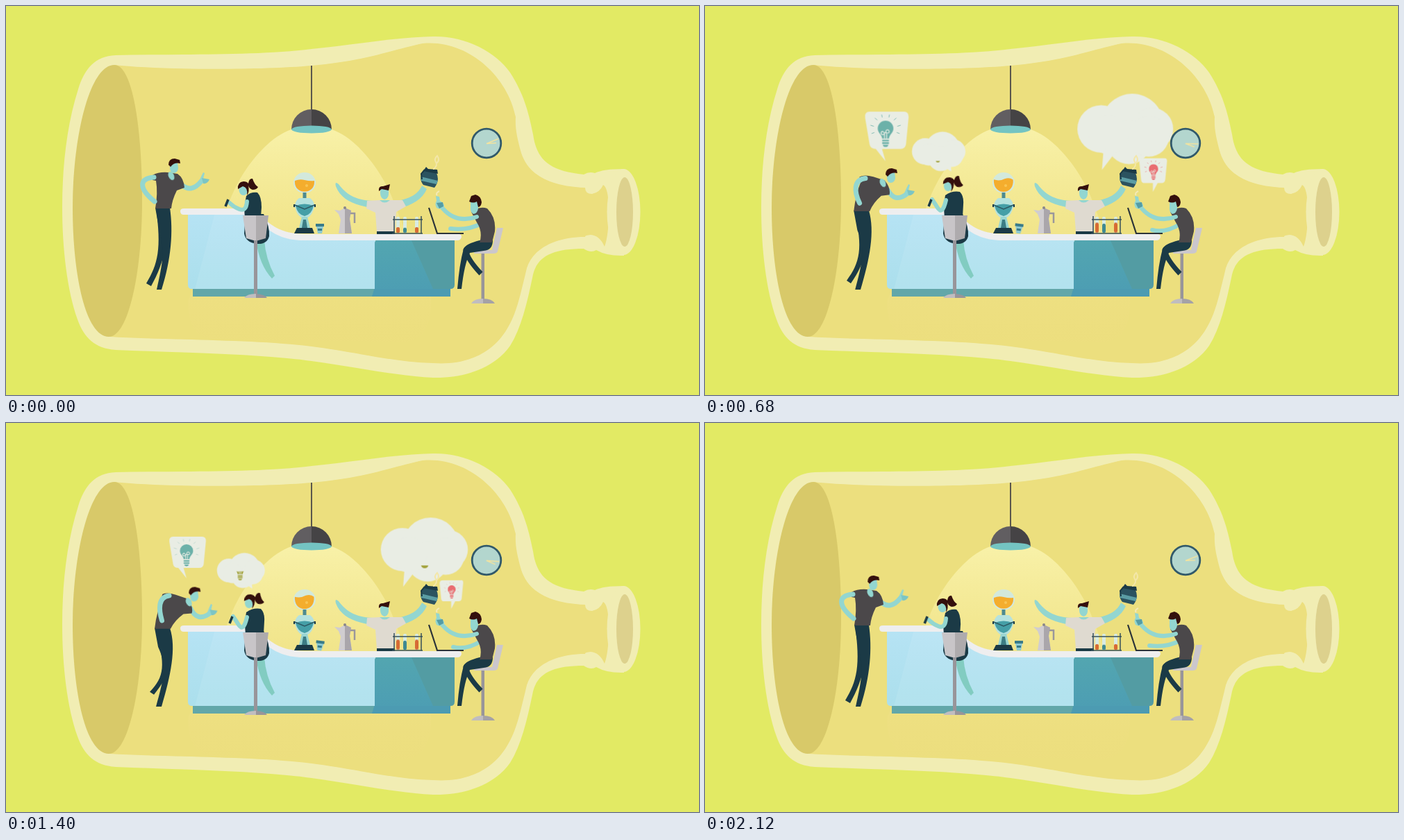
These frames come from a looping animation (998x561 px, 2.16 s). An HTML page without scripts:

```html
<!DOCTYPE html>
<html lang="en">
<head>
<meta charset="utf-8">
<title>Ideas in a bottle</title>
<style>
html,body{margin:0;width:100%;height:100%;overflow:hidden;background:#e2ea64}
svg{display:block;width:100vw;height:100vh}
.skin{fill:#93d6d0}
.limb{fill:none;stroke:#93d6d0;stroke-width:7;stroke-linecap:round;stroke-linejoin:round}
.navy{fill:#1b3a46}
.gray{fill:#4b484a}
.hair{fill:#34100d}
.say{fill:#e9ede4}
.glass{fill:#f1edb3}

/* Every part plays there and back */
.m,.mv{animation:1080ms ease-in-out infinite alternate}
.pop,.rise,.ray{animation:1080ms linear infinite alternate}
.mv{transform-box:fill-box;transform-origin:center}

/* standing man */
.lean{animation-timing-function:linear}
.m-head{animation-name:mHead}
.m-collar{animation-name:mCollar}
.m-torso{animation-name:mTorso}
.m-back{animation-name:mBack}
.m-arm{animation-name:mArm}
.m-hand{animation-name:mHand}
.m-leg{animation-name:mLeg}
.m-kick{animation-name:mKick;animation-timing-function:linear}
@keyframes mHead{0%{transform:none}33%{transform:translate(2px,0)}63%{transform:translate(26px,14px)}72%,100%{transform:translate(30px,17px)}}
@keyframes mCollar{0%,33%{transform:none}63%{transform:translate(18px,10px)}72%,100%{transform:translate(27px,14px)}}
@keyframes mTorso{
 0%,31%{d:path("M211 244Q220 239 233 240L247 242Q256 248 257 262L246 266Q239 280 238 292L215 292Q219 270 216 252L211 251Z")}
 72%,100%{d:path("M226 247Q232 244 245 248L262 254Q271 266 268 275L256 276Q243 285 237 297L214 297Q217 270 226 256L224 254Z")}}
@keyframes mBack{0%,31%{d:path("M213 247C190 249 192 264 214 282")}72%,100%{d:path("M236 249C220 251 221 269 225 285")}}
@keyframes mArm{0%,31%{d:path("M253 258Q267 270 281 253")}72%,100%{d:path("M266 267Q276 290 296 274")}}
@keyframes mHand{0%{transform:none}33%{transform:translate(2px,-1px) rotate(8deg)}63%{transform:translate(9px,17px)}72%,100%{transform:translate(12px,22px) rotate(-4deg)}}
@keyframes mLeg{
 0%,31%{d:path("M215 291L236 291C241 325 238 365 224 409L217 409C226 370 229 350 221 325Z")}
 72%,100%{d:path("M214 296L236 296C246 325 237 365 224 409L216 409C227 370 232 350 219 323Z")}}
@keyframes mKick{
 0%,33%{d:path("M216 291L232 291C236 335 228 370 209 404L202 400C219 372 224 350 216 291Z")}
 63%{d:path("M215 295L232 295C238 338 233 368 210 400L204 396C223 370 228 350 215 295Z")}
 70%{d:path("M215 296L232 296C242 340 237 362 213 392L207 388C228 366 230 350 215 296Z")}
 96%,100%{d:path("M215 296L232 296C256 347 256 350 217 378L212 373C240 352 242 352 215 296Z")}}

/* woman */
.w-head{animation-name:wHead}
.w-torso{animation-name:wTorso}
.w-arm{animation-name:wArm}
.w-pen{animation-name:wPen}
@keyframes wHead{0%,3%{transform:none}31%,100%{transform:translate(9px,-5px) rotate(9deg)}}
@keyframes wTorso{
 0%{d:path("M346 274Q352 268 362 269Q368 275 368 290L367 304L344 304Q342 290 346 274Z")}
 31%,100%{d:path("M346 273Q356 266 367 268Q373 274 372 286L371 304L345 304Q343 288 346 273Z")}}
@keyframes wArm{0%{d:path("M347 282Q346 297 336 293Q328 290 322 284")}31%,100%{d:path("M347 280Q342 302 335 291Q332 286 327 279")}}
@keyframes wPen{0%{transform:none}31%,100%{transform:translate(6px,0)}}

/* barista and seated man */
.b-left{animation-name:bLeft}
.b-right{animation-name:bRight}
.b-pot{animation-name:bPot}
.b-steam{animation-name:bSteam}
@keyframes bLeft{
 0%,71%{d:path("M530 281C505 281 490 272 479 257Q473 252 475 260C483 281 505 288 528 291Z")}
 95%,100%{d:path("M530 281C505 281 490 287 474 288Q468 290 474 292C490 293 505 292 528 291Z")}}
@keyframes bRight{
 0%,71%{d:path("M562 281C584 278 594 270 599 259L606 264C600 278 585 288 564 292Z")}
 95%,100%{d:path("M562 280C580 280 592 285 606 284L606 291C592 294 580 293 564 292Z")}}
@keyframes bPot{0%,71%{transform:none}95%,100%{transform:translate(9px,39px) rotate(10deg)}}
@keyframes bSteam{0%,71%{transform:none}95%,100%{transform:translate(5px,33px)}}
.s-head{animation-name:sHead}
.s-arm{animation-name:sArm}
.s-low{animation-name:sLow}
.s-cup{animation-name:sCup}
.s-leg{animation-name:sLeg}
@keyframes sHead{0%,71%{transform:none}95%,100%{transform:translate(-4px,1px)}}
@keyframes sArm{0%,71%{d:path("M678 304Q648 314 629 292")}95%,100%{d:path("M678 302Q655 313 633 294")}}
@keyframes sLow{0%,30%{d:path("M684 314Q665 324 640 321")}63%,100%{d:path("M685 314Q663 328 644 323")}}
@keyframes sCup{0%,71%{transform:none}95%,100%{transform:translate(5px,5px)}}
@keyframes sLeg{0%,71%{d:path("M694 346Q665 345 662 352Q665 366 684 386")}95%,100%{d:path("M694 346Q661 341 658 348Q661 363 679 378")}}

/* props */
.hands{animation-name:hands;transform-origin:692px 198px;animation-timing-function:linear}
@keyframes hands{to{transform:rotate(38deg)}}
.brew{animation-name:brew}
@keyframes brew{
 0%{d:path("M416 252Q423 249 430 251Q438 253 444 252C446 273 414 273 416 252Z")}
 33%{d:path("M416 249Q424 253 431 250Q438 247 444 250C446 274 414 274 416 249Z")}
 100%{d:path("M416 252Q424 253 432 248Q439 246 443 251C446 274 414 274 416 252Z")}}
.tube{animation-name:tube;transform-box:fill-box;transform-origin:bottom}
@keyframes tube{0%{transform:scaleY(.8)}60%,100%{transform:scaleY(1.45)}}
.cup{animation-name:cup}
@keyframes cup{0%{transform:none}33%,100%{transform:rotate(7deg)}}
.puff{animation-name:puff;opacity:0}
@keyframes puff{0%,22%,46%,100%{opacity:0}30%,37%{opacity:1}}

/* bubbles */
.p1{animation-name:p1;transform-origin:260px 224px}
.p2{animation-name:p2;transform-origin:353px 238px}
.p3{animation-name:p3;transform-origin:574px 235px}
.p4{animation-name:p4;transform-origin:649px 267px}
.p5{animation-name:p5;transform-origin:311px 156px}
@keyframes p1{0%,34%{transform:scale(0)}41%{transform:scale(1.05)}52%{transform:scale(1.22)}63%{transform:scale(1.28)}70.4%{transform:scale(1.07)}82%{transform:scale(.96)}96%,100%{transform:scale(1)}}
@keyframes p2{0%,29%{transform:scale(0)}33.3%{transform:scale(.16)}50%{transform:scale(.85)}63%{transform:scale(.885)}70.4%{transform:scale(.79)}85%{transform:scale(1.05)}96%,100%{transform:scale(1)}}
@keyframes p3{0%,36%{transform:scale(0)}52%{transform:scale(.87)}60%{transform:scale(1.2)}63%{transform:scale(1.18)}70.4%{transform:scale(1.07)}84%{transform:scale(.97)}96%,100%{transform:scale(1)}}
@keyframes p4{0%,28%{transform:translate(-19px,0) scale(0)}33.3%{transform:translate(-19px,0) scale(.28)}50%{transform:translate(-6px,0) scale(.8)}63%{transform:translate(-4px,1px) scale(.85)}70.4%{transform:translate(-8px,1px) scale(.72)}96%,100%{transform:none}}
@keyframes p5{0%,74%{transform:scale(0)}87%{transform:scale(1.6)}96%,100%{transform:scale(1)}}
.r2{animation-name:r2}
.r3{animation-name:r3}
.r4{animation-name:r4}
@keyframes r2{0%,61%{clip-path:inset(100% 0 0 0)}63%{clip-path:inset(92% 0 0 0)}70.4%{clip-path:inset(52% 0 0 0)}84%,100%{clip-path:inset(0)}}
@keyframes r3{0%,68%{clip-path:inset(100% 0 0 0)}70.4%{clip-path:inset(92% 0 0 0)}90%,100%{clip-path:inset(0)}}
@keyframes r4{0%,40%{clip-path:inset(100% 0 0 0)}54%,100%{clip-path:inset(0)}}
.early{animation-name:early}
.late{animation-name:late}
@keyframes early{0%,52%{opacity:0}58%,65%{opacity:1}75%,100%{opacity:0}}
@keyframes late{0%,88%{opacity:0}95%,100%{opacity:1}}
</style>
</head>
<body>
<svg viewBox="0 0 998 561" preserveAspectRatio="none">
<defs>
 <linearGradient id="glow" x1="0" y1="0" x2="0" y2="1">
  <stop offset="0" stop-color="#f8f1a8"/><stop offset=".45" stop-color="#f3e790" stop-opacity=".8"/><stop offset="1" stop-color="#eedc80" stop-opacity=".15"/>
 </linearGradient>
 <linearGradient id="front" x1="0" y1="0" x2="0" y2="1">
  <stop offset="0" stop-color="#b6e3f4"/><stop offset="1" stop-color="#abdfec"/>
 </linearGradient>
 <linearGradient id="side" x1="0" y1="0" x2="0" y2="1">
  <stop offset="0" stop-color="#53a6b0"/><stop offset="1" stop-color="#4d9eb3"/>
 </linearGradient>
 <g id="bulb">
  <path d="M-14 0A14 14 0 1 1 14 0C14 8 7 10 6 18H-6C-7 10-14 8-14 0Z"/>
  <path d="M-6 20H6V23H-6ZM-6 24.500H6V27.500H-6ZM-5 29H5Q4 33 0 33Q-4 33-5 29Z"/>
  <path d="M-2 18V7M2 18V7M-2 8A3 3 0 1 1-5 5Q-5 8 5 8A3 3 0 1 0 2 8" fill="none" stroke="#e9ede4" stroke-width="1.500"/>
 </g>
 <path id="rays" d="M-20 7L-25 9M-21-4L-27-6M-15-15L-19-19M-6-20L-7-25M6-20L7-25M15-15L19-19M21-4L27-6M20 7L25 9" fill="none" stroke-width="1"/>
 <g id="cloud">
  <circle cx="-29" r="29"/><circle cx="9" cy="-5" r="38"/><circle cx="33" r="26"/>
  <circle cx="5" cy="16" r="27"/><circle cx="29" cy="9" r="25"/><circle cx="-20" cy="7" r="24"/>
 </g>
</defs>

<!-- bottle -->
<rect width="998" height="561" fill="#e2ea64"/>
<path class="glass" d="M158 71C250 69 360 72 440 62C510 55 560 45 615 44C662 43 705 66 726 96C745 126 752 150 759 185C764 220 780 238 832 243Q840 238 848 241Q860 235 890 235V360Q866 361 850 352Q842 357 832 350C785 350 763 362 758 392C750 430 742 464 726 490C705 520 664 537 615 536C560 533 500 520 440 512C360 501 250 500 158 496C128 494 112 478 103 452C88 410 81 350 81 290C81 230 88 170 104 120C113 91 128 72 158 71Z"/>
<path fill="#ecdf7e" d="M156 85C220 92 360 93 440 86C520 79 560 62 600 54C664 48 722 100 734 160C733 176 736 190 742 212C752 242 780 260 834 262Q834 271 844 271Q855 269 860 258Q868 262 868 297Q868 330 862 347Q855 331 842 330Q833 331 834 333C788 333 758 352 750 378C740 420 735 444 722 465C698 506 656 518 615 515C560 514 510 500 440 491C360 481 240 482 150 477Z"/>
<path fill="#d8c969" d="M156 85C183 85 196 180 196 281C196 385 176 477 148 477C115 477 96 390 96 290C96 190 120 85 156 85Z"/>
<ellipse class="glass" cx="889.500" cy="297" rx="24" ry="62"/>
<ellipse cx="891" cy="297" rx="12" ry="50" fill="#ddd18d"/>

<!-- lamp -->
<path fill="url(#glow)" d="M411 178C375 190 335 240 318 292L262 425Q262 480 300 480L575 485Q615 480 612 420L562 292C545 240 505 190 469 178Z"/>
<path d="M440 86V150" stroke="#4b4748" stroke-width="1.800"/>
<path fill="#615e61" d="M411 178A29 29 0 0 1 440 149V178Z"/>
<path fill="#454345" d="M440 149A29 29 0 0 1 469 178H440Z"/>
<ellipse cx="440" cy="178" rx="29" ry="5.500" fill="#74c4c2"/>

<!-- barista -->
<path class="skin m b-left" d="M530 281C505 281 490 272 479 257Q473 252 475 260C483 281 505 288 528 291Z"/>
<path class="skin m b-right" d="M562 281C584 278 594 270 599 259L606 264C600 278 585 288 564 292Z"/>
<path fill="#dfdad0" d="M520 281L538 280H553L571 280L576 289L562 297L560 326H534L532 298L519 292Z"/>
<path class="navy" d="M534 325H560V331H534Z"/>
<path class="skin" d="M539 263H551V272Q550 278 545 279Q539 277 539 270ZM538 280H553Q545 287 538 280Z"/>
<path class="hair" d="M537 267Q536 259 543 260L553 257L551 266L541 264Z"/>

<!-- counter -->
<path fill="#62a7a9" d="M269 406H640V419H269Z"/><path fill="#4c9bb2" d="M531 406H640V419H527Z"/>
<path fill="url(#front)" d="M262 298H345C372 301 380 336 430 336H532V408H268Q262 408 262 402Z"/>
<path fill="#fff" opacity=".08" d="M301 298H345C372 301 380 336 430 336H531V408H272Z"/>
<path fill="#539ca3" d="M536 336H646V402Q646 408 640 408H531V343Q531 338 536 336Z"/>
<path fill="url(#side)" d="M536 336H583L615 408H531V343Q531 338 536 336Z"/>
<path fill="#eeeeef" d="M256 292H342C372 292 372 328 430 329H652Q656 329 656 333Q655 338 650 338H428C375 338 366 301 343 301H256Q251 301 251 296Q251 292 256 292Z"/>

<!-- siphon brewer -->
<path class="navy" d="M419 320H441L444 328H415ZM414 286H418V290H414ZM442 286H446V290H442Z"/>
<ellipse cx="430" cy="255" rx="16" ry="15" fill="#d3e9dc"/>
<path class="m brew" fill="#f4ad2d" d="M416 252Q423 249 430 251Q438 253 444 252C446 273 414 273 416 252Z"/>
<circle cx="433" cy="259" r="2" fill="#f9c452"/>
<path fill="#4d8a90" d="M427.500 269H432.500V278H427.500Z"/>
<path fill="#b5e2de" d="M422 277H438Q444 282 444 289Q442 300 435 305H425Q418 300 416 289Q416 282 422 277Z"/>
<path fill="#459fa7" d="M417 288Q430 283 443 288Q440 301 430 303Q420 301 417 288Z"/>
<path d="M416 287L430 293L444 287" fill="none" stroke="#2c5963" stroke-width="1.500"/>
<path fill="#9ad6d2" d="M426 304H434L438 320H422Z"/><path fill="#3c7c84" d="M428 308H432L434 320H426Z"/>

<g class="mv cup"><path fill="#8cc9d3" d="M447 318H457L455 328H449Z"/><path fill="#397b89" d="M446 314H458V318H446ZM449 321H455V324H449Z"/></g>

<!-- coffee pot -->
<path fill="#d0cdd0" d="M481 295L488 291L497 295L495 307L498 328H479L482 308L479 300L473 294Z"/>
<path fill="#aaa6ab" d="M488 291L497 295L495 307L498 328H488Z"/>
<path d="M496 299H502V313" fill="none" stroke="#9a979b" stroke-width="2.500"/><circle cx="488" cy="291" r="2" fill="#89868a"/>
<path class="say m puff" d="M468 288Q470 279 475 278Q473 282 476 284Q474 291 468 292Z"/>

<!-- tubes -->
<g fill="#d8ebe3"><rect x="562" y="304" width="5" height="23" rx="2"/><rect x="572" y="304" width="5" height="23" rx="2"/><rect x="589" y="304" width="5" height="23" rx="2"/></g>
<rect class="m tube" x="562" y="317" width="5" height="10" rx="2" fill="#d66b34"/>
<rect class="m tube" x="572" y="318" width="5" height="9" rx="2" fill="#3f8991"/>
<rect class="m tube" x="589" y="317" width="5" height="10" rx="2" fill="#d66b34"/>
<path d="M559 303V328M598 303V328M557 308H600M556 328H600" stroke="#365059" stroke-width="1.500"/>

<!-- standing man -->
<path class="navy m m-kick" d="M216 291L232 291C236 335 228 370 209 404L202 400C219 372 224 350 216 291Z"/>
<path class="navy m lean m-leg" d="M215 291L236 291C241 325 238 365 224 409L217 409C226 370 229 350 221 325Z"/>
<path class="limb m lean m-arm" d="M253 258Q267 270 281 253"/>
<path class="gray m lean m-torso" d="M211 244Q220 239 233 240L247 242Q256 248 257 262L246 266Q239 280 238 292L215 292Q219 270 216 252L211 251Z"/>
<path class="limb m lean m-back" d="M213 247C190 249 192 264 214 282"/>
<g class="m lean m-collar"><ellipse class="skin" cx="238" cy="245" rx="4" ry="6.500" transform="rotate(-25 238 245)"/></g>
<g class="mv lean m-head"><path class="skin" d="M236 226H247L248 234Q247 241 241 241Q236 240 236 233Z"/><path class="hair" d="M234 229Q234 220 243 220L250 222L251 227Q242 225 237 232Z"/></g>
<g class="mv lean m-hand"><path class="skin" d="M277 255L281 246L284 240L286 241L284 249L280 258Z"/><path fill="#7cc5c4" d="M282 248L293 250Q290 257 284 256Z"/></g>

<!-- woman -->
<path fill="#82ccc1" d="M360 338H372Q374 365 387 389L383 393Q365 374 360 338Z"/>
<path class="navy" d="M345 300H371Q380 318 379 332Q376 344 361 343Q345 341 343 328Z"/>
<path class="navy m w-torso" d="M346 274Q352 268 362 269Q368 275 368 290L367 304L344 304Q342 290 346 274Z"/>
<path class="limb m w-arm" style="stroke-width:6" d="M347 282Q346 297 336 293Q328 290 322 284"/>
<path class="m w-pen" d="M316 289L320 279" stroke="#1b3a46" stroke-width="3.500"/>
<g class="mv w-head"><ellipse class="skin" cx="342" cy="265" rx="6.500" ry="8"/><path class="hair" d="M334 264Q333 254 342 253Q347 253 349 256Q350 248 355 249Q358 258 363 261Q361 265 355 265Q350 263 349 259Q351 268 347 273Q349 262 341 260Z"/></g>
<path fill="#c8c5c8" d="M341 302H360V339L346 335Z"/><path fill="#aeabad" d="M360 302H378L374 335L360 339Z"/>
<path fill="#98959a" d="M357 338H362V418H357Z"/><path fill="#c0bdc0" d="M343 421Q347 415 360 415V421Z"/><path fill="#98959a" d="M360 415Q373 416 376 421H360Z"/>

<!-- seated man -->
<path fill="#cbc7cc" d="M707 320H716L708 354Q707 357 702 357H674Q674 352 680 352H700Z"/>
<path fill="#98959a" d="M684.500 357H689V427H684.500Z"/><path fill="#c0bdc0" d="M670 429Q674 422 687 422V429Z"/><path fill="#a5a2a6" d="M687 422Q700 422 704 429H687Z"/>
<path class="m s-leg" fill="none" stroke="#1b3a46" stroke-width="7" d="M694 346Q665 345 662 352Q665 366 684 386"/>
<path class="navy" d="M682 338H701Q701 352 688 353L668 356Q660 372 656 408H650Q653 372 659 350Q662 343 682 338Z"/>
<path class="limb m s-low" style="stroke-width:6" d="M684 314Q665 324 640 321"/>
<path class="gray" d="M670 297Q682 288 693 292Q706 305 704 325L700 341H682Q687 326 678 312Z"/>
<path class="limb m s-arm" style="stroke-width:6" d="M678 304Q648 314 629 292"/>
<g class="m s-head"><path class="skin" d="M669 281H680V292Q679 299 673 300Q668 297 669 290Z"/><path class="hair" d="M667 282L670 274L676 272Q684 274 685 283Q684 290 680 290L678 282Q673 285 667 282Z"/></g>
<path d="M609 291L621 328H659" fill="none" stroke="#2b3338" stroke-width="2.200"/>

<!-- bubbles -->
<g class="pop p1">
 <path class="say" d="M242 168H281Q286 168 286 174L283 205Q282 210 277 210H256L260 224L249 210Q243 210 242 205L237 175Q236 168 242 168Z"/>
 <g transform="translate(260 187) scale(.63)" fill="#6cb1a9" stroke="none"><use href="#bulb"/><use class="ray early" href="#rays" stroke="#6cb1a9"/></g>
</g>
<g class="pop p2">
 <use class="say" href="#cloud" transform="translate(334 206) scale(.745)"/><path class="say" d="M340 229L355 239L354 224Z"/>
 <g transform="translate(333 200) scale(.73)" fill="#a2a23b"><g class="rise r2"><use href="#bulb"/></g><use class="ray late" href="#rays" stroke="#a2a23b"/></g>
</g>
<g class="pop p3">
 <use class="say" href="#cloud" transform="translate(600 186)"/><path class="say" d="M574 210L572 236L588 215Z"/>
 <g transform="translate(601 178)" fill="#a2a23b"><g class="rise r3"><use href="#bulb"/></g><use class="ray late" href="#rays" stroke="#a2a23b"/></g>
</g>
<g class="pop p4">
 <path class="say" d="M633 210H668Q673 209 673 215L670 246Q669 252 664 252H657L649 267V252H634Q630 252 629 247L626 216Q626 210 633 210Z"/>
 <g transform="translate(650 228) scale(.57)" fill="#e96c70"><g class="rise r4"><use href="#bulb"/></g><use class="ray early" href="#rays" stroke="#e96c70"/></g>
</g>
<g class="pop p5">
 <use class="say" href="#cloud" transform="translate(320 140) scale(.345)"/><path class="say" d="M311 147L309 156L318 151Z"/>
 <use href="#bulb" transform="translate(320.500 138) scale(.36)" fill="#e96c70"/>
</g>

<!-- clock -->
<circle cx="692" cy="198" r="20.800" fill="#b3d6ce" stroke="#31596a" stroke-width="2.800"/>
<path class="m hands" d="M692 198.500L709 191.500M692 198.500L706 197.500" stroke="#f1e3a0" stroke-width="1.500"/>

<!-- hand-held flask and pot -->
<g class="m s-cup"><path class="skin" d="M619 274L624 275L625 281Q631 284 631 289Q627 295 620 291Q617 285 620 281Z"/><path fill="#559ca5" d="M620 284L629 283L630 289L624 292Z"/><path d="M621 273Q618 270 624 267" fill="none" stroke="#f3e9b5" stroke-width="2"/></g>
<g class="mv b-pot">
 <path fill="#2b5360" d="M602 237L620 241Q625 252 617 262L601 258Q593 249 602 237Z"/>
 <path fill="#5b9da4" d="M597 246L622 252L620 257L598 252Z"/>
 <path class="navy" d="M605 232L608 235L621 236L622 242L601 238Z"/>
 <path d="M603 236L598 242L599 250" fill="none" stroke="#1b3a46" stroke-width="2"/>
</g>
<path class="m b-steam" d="M616 235Q622 230 619 225Q616 221 621 216Q625 222 621 226" fill="none" stroke="#f3e7a9" stroke-width="2" stroke-linecap="round"/>
</svg>
</body>
</html>
```
